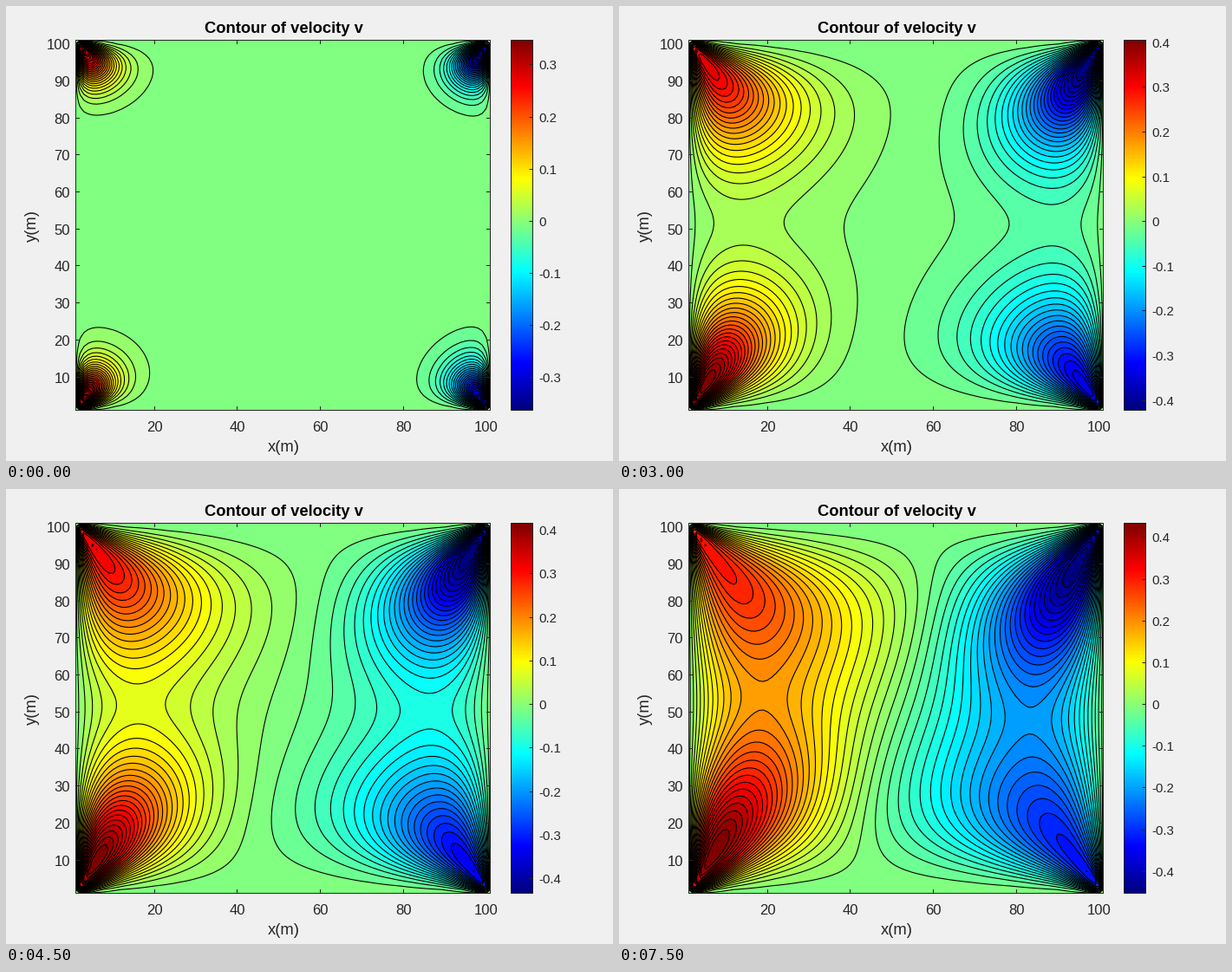
A matplotlib script for the animation above (8000 ms loop, 700 px wide and 525 px high).

```python
import numpy as np
import matplotlib.pyplot as plt
from matplotlib.animation import FuncAnimation
from matplotlib.colors import ListedColormap
from matplotlib.patches import Circle, Polygon, Rectangle

plt.rcParams["font.family"] = "Liberation Sans"

W, H = 700, 525
L, R, T, B = 80.5, 558.5, 39.5, 466.5      # plot box
CL, CR = 582.5, 607.5                      # colour bar
INK = "#262626"
FRAMES, BANDS = 16, 51
TOOLBAR_FRAMES = {2, 10, 11}
PT = 0.72                                  # points per pixel at 100 dpi

# --- flow: square cavity, lids sliding in opposite directions ---------------
N = 101
h, dt, nu = 1 / (N - 1), 0.001, 0.02
SWEEP = np.linalg.inv(4 * np.eye(N - 2) - np.eye(N - 2, k=-1))


def step(psi, w):
    """Advance vorticity, then relax the stream function by one sweep."""
    w[0] = -2 * psi[1] / h**2 - 2 / h
    w[-1] = -2 * psi[-2] / h**2 - 2 / h
    w[1:-1, 0] = -2 * psi[1:-1, 1] / h**2
    w[1:-1, -1] = -2 * psi[1:-1, -2] / h**2

    u = (psi[2:, 1:-1] - psi[:-2, 1:-1]) / (2 * h)
    v = (psi[1:-1, :-2] - psi[1:-1, 2:]) / (2 * h)
    n, s, e, o = w[2:, 1:-1], w[:-2, 1:-1], w[1:-1, 2:], w[1:-1, :-2]
    c = w[1:-1, 1:-1]
    spread = nu * (n + s + e + o - 4 * c) / h**2
    w[1:-1, 1:-1] = c + dt * (spread - (u * (e - o) + v * (n - s)) / (2 * h))

    known = psi[2:, 1:-1] + psi[1:-1, 2:] + h**2 * w[1:-1, 1:-1]
    for j in range(1, N - 1):
        psi[j, 1:-1] = SWEEP @ (known[j - 1] + psi[j - 1, 1:-1])


def simulate():
    """Snapshots of v, paced so the mid-height upflow is 0.124 at the 12th."""
    psi, w = np.zeros((N, N)), np.zeros((N, N))
    past, pace = [np.zeros((N, N), np.float32)], None
    while len(past) < 2400:
        step(psi, w)
        v = np.zeros((N, N), np.float32)
        v[:, 1:-1] = (psi[:, :-2] - psi[:, 2:]) / (2 * h)
        past.append(v)
        if pace is None and v[52, :50].max() >= 0.124:
            pace = (len(past) - 1) / 12
        if pace and len(past) > FRAMES * pace + 1:
            break
    pace = pace or 50
    return [past[round(pace * (k + 1))].astype(float) for k in range(FRAMES)]


fields = simulate()


# --- fixed parts ------------------------------------------------------------
def jet(t):
    t = np.asarray(t)[:, None]
    mid = np.array([3.0, 2.0, 1.0])
    return np.clip(1.5 - np.abs(4 * t - mid), 0, 1)


fig = plt.figure(figsize=(W / 100, H / 100), dpi=100, facecolor="#f0f0f0")
ax = fig.add_axes([0, 0, 1, 1])
ax.axis("off")


def line(xs, ys, color=INK, width=1.0):
    return ax.plot(xs, ys, color=color, lw=width * PT, snap=False, zorder=5,
                   solid_capstyle="butt")[0]


def label(x, y, text, px, color=INK, **kw):
    kw.setdefault("ha", "center")
    return ax.text(x, y, text, fontsize=px * PT, color=color,
                   va="baseline", zorder=6, **kw)


def frame_box(x0, x1):
    ax.add_patch(Rectangle((x0, T), x1 - x0, B - T, fill=False, ec=INK,
                           lw=PT, snap=False, zorder=5))


def sx(x):
    return L + (x - 1) * (R - L) / 100


def sy(y):
    return B - (y - 1) * (B - T) / 100


def crisp(p):
    return np.floor(p) + 0.5


frame_box(L, R)
frame_box(CL, CR)
for x in range(20, 101, 20):
    px = crisp(sx(x))
    line([px, px], [B, B - 4.5])
    line([px, px], [T, T + 4.5])
    label(sx(x), 491, str(x), 16.67)
for y in range(10, 101, 10):
    py = crisp(sy(y))
    line([L, L + 4.5], [py, py])
    line([R, R - 4.5], [py, py])
    label(74, sy(y) + 6.5, str(y), 16.67, ha="right")
label(320, 31, "Contour of velocity v", 18.33, "black", weight="bold")
label(320, 514, "x(m)", 18.33)
label(35, 253, "y(m)", 18.33, rotation=90, rotation_mode="anchor")

ramp = np.linspace(0, 1, 256)
ax.imshow(ramp[::-1, None], cmap=ListedColormap(jet(ramp)),
          extent=(CL, CR, B, T), aspect="auto", interpolation="nearest",
          zorder=1)
ax.set_xlim(0, W)
ax.set_ylim(H, 0)


# --- hover toolbar ----------------------------------------------------------
def make_toolbar():
    gray = "#7c7c7c"
    parts = []
    style = dict(ec=gray, fc="none", lw=1.5 * PT, zorder=5)

    def stroke(*pts, width=1.5):
        parts.append(line(*zip(*pts), color=gray, width=width))

    def shape(patch):
        parts.append(ax.add_patch(patch))

    # export
    stroke((414, 28), (414, 32.5), (431, 32.5), (431, 29))
    shape(Polygon([(416, 28.5), (418, 24), (424, 21), (424, 17.5),
                   (430, 22.5), (424, 27), (424, 24.5), (420, 25.5)],
                  **style))
    # note
    shape(Rectangle((441.5, 16.5), 15, 17, **style))
    for y in (22, 27):
        stroke((446, y), (453, y))
        stroke((439, y), (443, y))
    # hand
    shape(Polygon([(469, 33.5), (464, 26), (466, 24.5), (469, 27), (468, 18.5),
                   (470, 18), (471.5, 24), (472, 16.5), (474, 16.5),
                   (475, 24), (477, 17.5), (479, 18), (478.5, 25),
                   (480.5, 20.5), (482, 21.5), (480, 30), (478, 33.5)],
                  joinstyle="round", **style))
    # zoom in, zoom out
    for x in (496, 521):
        shape(Circle((x, 23), 7, **style))
        stroke((x + 5, 28), (x + 11, 34), width=2.2)
        stroke((x - 4, 23), (x + 4, 23))
    stroke((496, 19), (496, 27))
    # home
    stroke((538, 26), (548, 16.5), (558, 26))
    stroke((541, 25), (541, 34), (545.5, 34), (545.5, 28), (550.5, 28),
           (550.5, 34), (555, 34), (555, 25))
    stroke((555, 17), (555, 21))
    return parts


toolbar = make_toolbar()

# --- moving parts -----------------------------------------------------------
gx, gy = sx(np.arange(1, N + 1)), sy(np.arange(1, N + 1))
band_colors = jet(np.arange(BANDS) / (BANDS - 1))
live = []


def update(k):
    for artist in live:
        artist.remove()
    live.clear()

    v = fields[k]
    levels = np.linspace(v.min(), v.max(), BANDS + 1)
    lo, hi = levels[0], levels[-2]
    edges = levels.copy()
    edges[-1] += 1e-6
    live.append(ax.contourf(gx, gy, v, levels=edges, colors=band_colors,
                            antialiased=False, zorder=1))
    live.append(ax.contour(gx, gy, v, levels=levels[1:-1], colors="black",
                           linestyles="solid", linewidths=1.1 * PT, zorder=2))

    for n in range(int(np.ceil(lo * 10)), int(np.floor(hi * 10)) + 1):
        y = B - (n / 10 - lo) / (hi - lo) * (B - T)
        live.append(line([CR - 4, CR], [crisp(y), crisp(y)]))
        live.append(label(614, y + 5.5, f"{n / 10:.1f}" if n else "0", 15,
                          ha="left"))
    for part in toolbar:
        part.set_visible(k in TOOLBAR_FRAMES)
    return live


anim = FuncAnimation(fig, update, frames=FRAMES, interval=500, repeat=True,
                     repeat_delay=0, init_func=lambda: update(0), blit=False)
plt.show()
```
